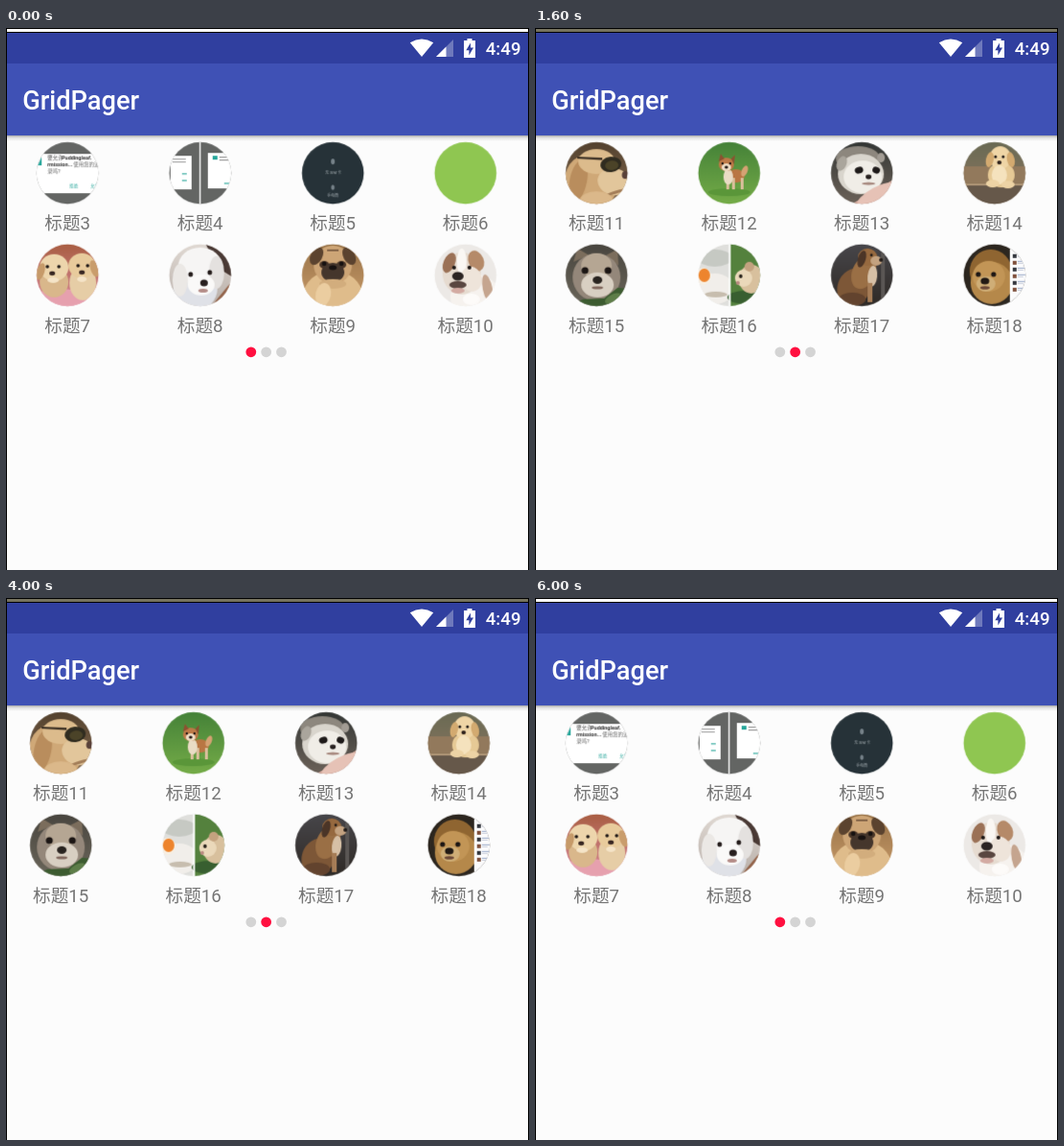
An HTML page with a canvas for the animation above (6100 ms loop, 546 px wide and 565 px high).

```html
<!DOCTYPE html>
<html lang="zh">
<head>
<meta charset="utf-8">
<title>GridPager</title>
<style>
html, body { margin: 0; width: 100%; height: 100%; overflow: hidden; background: #fcfcfc; }
canvas { display: block; }
</style>
</head>
<body>
<canvas id="stage" width="546" height="565"></canvas>
<script>
const ctx = document.getElementById('stage').getContext('2d');
const LOOP = 6100, STEP = 100;
const PAGE = 552, COL = 138.5, ROW = 106.5, RADIUS = 32.3;
const FONT = 'Roboto, "Noto Sans CJK SC", "Noto Sans CJK", sans-serif';

// Travel per step while dragged, then a quintic settle that ends at `end`.
const swipes = [
  { at: 900, end: 1680, from: 0, to: 1, drag: [20, 150, 315, 460] },
  { at: 2200, end: 3010, from: 1, to: 2, drag: [60, 245, 432, 504.5] },
  { at: 3600, end: 4280, from: 2, to: 1, drag: [69, 299] },
  { at: 4800, end: 5367, from: 1, to: 0, drag: [14, 319] }
];

function scrollAt(t) {
  const s = swipes.findLast((swipe) => t >= swipe.at);
  if (!s) return 0;
  if (t >= s.end) return s.to * PAGE;
  const i = (t - s.at) / STEP, last = s.drag.length - 1;
  let moved = s.drag[i];
  if (i > last) {
    const released = s.at + last * STEP;
    moved = PAGE - (PAGE - s.drag[last]) * ((s.end - t) / (s.end - released)) ** 5;
  }
  return Math.round(s.from * PAGE + (s.to - s.from) * moved);
}

// Thumbnails: local coordinates run from -32 to 32.
let g;
const fill = (c) => rect(-34, -34, 68, 68, c);
function rect(x, y, w, h, c) {
  g.fillStyle = c;
  g.fillRect(x, y, w, h);
}
function oval(x, y, rx, ry, c, turn = 0) {
  g.fillStyle = c;
  g.beginPath();
  g.ellipse(x, y, rx, ry, turn, 0, 7);
  g.fill();
}
function poly(c, ...p) {
  g.fillStyle = c;
  g.beginPath();
  for (let i = 0; i < p.length; i += 2) g.lineTo(p[i], p[i + 1]);
  g.fill();
}
function fade(top, bottom) {
  const grad = g.createLinearGradient(0, -32, 0, 32);
  grad.addColorStop(0, top);
  grad.addColorStop(1, bottom);
  fill(grad);
}
function note(text, x, y, size, c, weight = 400) {
  g.fillStyle = c;
  g.font = `${weight} ${size}px ${FONT}`;
  g.fillText(text, x, y);
}
function eyes(x, y, gap, r, c = '#1c1614') {
  oval(x - gap, y, r, r, c);
  oval(x + gap, y, r, r, c);
}

const sharp = new Set([3, 4, 5, 6]);
const pictures = {
  3() {
    fill('#646664');
    rect(-34, -20, 68, 41, '#fff');
    poly('#26a69a', -31, -8, -27, -17, -27, -8);
    note('要允许', -21, -14, 5.5, '#555');
    note('Puddingleaf.', -6, -14, 5.5, '#333', 700);
    note('rmission...', -21, -7, 5.5, '#333', 700);
    note('使用您的通', 6, -7, 5.5, '#666');
    note('录吗?', -21, 0, 5.5, '#666');
    note('拒绝', 2, 15, 4.5, '#26a69a');
    note('允许', 24, 15, 4.5, '#26a69a');
  },
  4() {
    fill('#636563');
    rect(-31, -18, 22, 35, '#fff');
    rect(8, -21, 24, 37, '#fff');
    rect(-1, -34, 1.5, 68, '#f4f4f4');
    rect(13, -18, 5, 4, '#26a69a');
    for (const y of [-15, -12]) {
      rect(-29, y, 14, 1, '#999');
      rect(20, y - 2, 10, 1, '#888');
    }
    for (const y of [0, 7]) rect(-19, y, 5, 1.5, '#5fbdb3');
    rect(25, 10, 5, 1.5, '#5fbdb3');
  },
  5() {
    fill('#263238');
    oval(0, -12, 2, 3, '#77838a');
    note('无 SIM 卡', -8, 1, 4, '#a6afb3');
    oval(0, 15, 1.8, 2.8, '#77838a');
    note('手电筒', -6, 25, 4, '#a6afb3');
  },
  6() {
    fill('#8fc651');
  },
  7() {
    fade('#a95e43', '#d9879a');
    oval(-8, 26, 30, 12, '#e6a0ae');
    oval(-14, 7, 15, 16, '#d9b78b');
    oval(16, 8, 14, 18, '#e6cda6');
    oval(-14, -8, 15, 14, '#edd5ac');
    oval(15, -10, 14, 13, '#e8cb9c');
    oval(-28, -4, 4, 9, '#c69a69', .3);
    oval(28, -7, 4, 9, '#c99d6c', -.3);
    eyes(-15, -9, 6, 1.8);
    eyes(16, -10, 5, 1.8);
    oval(-16, -2, 3, 2.2, '#382722');
    oval(15, -3, 3, 2.2, '#382722');
    oval(-15, 5, 6, 3, '#f5e4c8');
    oval(15, 4, 5, 3, '#f5e4c8');
  },
  8() {
    fade('#e0d9d3', '#b8afa9');
    poly('#493934', 5, -34, 34, -34, 34, 2, 18, -8);
    poly('#93634a', 10, 34, 34, 5, 34, 34);
    oval(-5, 13, 23, 24, '#dfe1e7');
    oval(0, -9, 23, 20, '#f6f5f4');
    oval(-21, 5, 8, 17, '#ebe8e5');
    oval(17, -3, 8, 17, '#e4e1df');
    oval(1, 10, 14, 11, '#faf9f8');
    oval(-10, -1, 2.4, 2.6, '#241c1b');
    oval(10, -3, 2.4, 2.6, '#241c1b');
    oval(4, 8, 4, 3.5, '#28201f');
    oval(3, 16, 5, 2, '#b48c87');
  },
  9() {
    fade('#987349', '#c99b68');
    oval(0, 22, 31, 27, '#dfbc8b');
    oval(0, -11, 20, 20, '#cda576');
    oval(-17, -20, 6, 10, '#5b432f', .5);
    oval(17, -20, 6, 10, '#5b432f', -.5);
    oval(-9, -11, 5, 4, '#493628');
    oval(9, -11, 5, 4, '#493628');
    oval(0, -3, 12, 10, '#45362c');
    eyes(0, -12, 9, 2.3, '#171211');
    oval(0, -8, 4, 2.5, '#171211');
    oval(0, 9, 14, 5, '#d2ad7d');
    oval(-10, 20, 8, 12, '#ebcda0', .2);
    rect(-6, -27, 12, 2, '#836346');
  },
  10() {
    fill('#ece9e6');
    oval(10, 22, 26, 23, '#f6f2ee');
    oval(23, 14, 5, 15, '#c5a58f', -.2);
    oval(-4, -2, 20, 22, '#e6dbd0');
    oval(-17, -13, 6, 11, '#9b7156', .4);
    oval(11, -15, 8, 11, '#b58a69', -.4);
    oval(-4, -14, 5, 14, '#faf7f3');
    oval(6, 4, 11, 13, '#eee4da', -.2);
    eyes(-4, -8, 8, 2);
    oval(-8, 1, 6, 4.5, '#2b2423');
    oval(-8, 10, 9, 4, '#5a4741');
    oval(-8, 16, 7, 3, '#d3aaa2');
    oval(6, 25, 9, 6, '#fdfbf9');
  },
  11() {
    fade('#54422f', '#83694f');
    oval(-6, 10, 27, 30, '#cfa877', -.3);
    oval(-19, 8, 9, 22, '#b98d5d', .2);
    oval(0, -12, 19, 13, '#dcbb8c');
    oval(18, 9, 17, 14, '#e2c69b', .2);
    poly('#3d3125', -20, -17, 6, -16, 6, -13.5, -20, -15);
    oval(15, -9, 11, 8, '#302c20', -.1);
    oval(16, -8, 7, 5, '#4b4328', -.1);
    oval(30, 2, 3.5, 4, '#594139');
    oval(20, 20, 12, 1.6, '#a37d58', -.3);
    oval(0, 28, 17, 9, '#dbb88a');
  },
  12() {
    fade('#458238', '#75ac48');
    oval(0, 20, 22, 4, '#5a9639');
    oval(7, 3, 9, 7, '#b97643');
    for (const x of [-3, 3, 12]) rect(x, 5, 3, 12, '#dabf9b');
    oval(-1, 4, 5, 8, '#eadcc5');
    oval(-3, -9, 8, 7, '#bd7947');
    poly('#8d5130', -11, -12, -9, -20, -5, -15);
    poly('#8d5130', 2, -15, 6, -19, 5, -9);
    oval(-3, -6, 5, 4, '#f0dfc7');
    eyes(-3, -10, 4, 1.2);
    oval(-3, -6, 1.8, 1.4, '#201713');
    oval(16, -2, 3, 6, '#d5a273', .4);
  },
  13() {
    fade('#343735', '#6c6259');
    oval(-4, -15, 23, 13, '#8d877e');
    oval(-1, 1, 24, 21, '#d9d5cd');
    oval(1, 4, 20, 17, '#f0ede7');
    poly('#ddb1a4', -10, 32, 11, 20, 34, 6, 34, 34);
    oval(15, 22, 22, 7, '#e6c2b6', -.5);
    oval(-3, -3, 4.5, 3.5, '#1f1b1a', -.3);
    oval(15, -3, 4, 3.5, '#1f1b1a', .3);
    oval(7, 4, 3, 2.4, '#27201f');
    oval(7, 11, 7, 1.5, '#a88a80');
    oval(-21, -10, 5, 8, '#aaa59c', .4);
    oval(20, -16, 4, 5, '#a29c94');
  },
  14() {
    fade('#6a6a54', '#8e7760');
    rect(-34, -7, 68, 20, '#92795c');
    rect(-34, 12, 68, 22, '#66584a');
    rect(-34, 11, 68, 2, '#ae9576');
    oval(7, 2, 14, 13, '#e6c995');
    oval(6, -16, 11, 12, '#efd5a6');
    oval(-5, -14, 4, 8, '#d3aa70', .2);
    oval(17, -14, 4, 8, '#d3aa70', -.2);
    oval(5, 2, 8, 10, '#f5e2bd');
    oval(-2, 11, 7, 4, '#edd3a5');
    oval(14, 12, 7, 4, '#edd3a5');
    eyes(5, -17, 4, 1.5);
    oval(5, -11, 2.4, 2, '#2e211b');
  },
  15() {
    fade('#49463f', '#6a655a');
    poly('#7b6d5c', -24, -14, -20, -28, -8, -21);
    poly('#7b6d5c', 10, -21, 22, -27, 23, -10);
    oval(0, 2, 25, 25, '#94877a');
    oval(0, -10, 16, 13, '#b5a693');
    oval(1, 10, 17, 13, '#d8cfc2');
    eyes(0, -5, 12, 3.6);
    oval(1, 5, 5, 4, '#28231f');
    oval(1, 13, 6, 1.6, '#80675d');
    poly('#3c5b30', -34, 34, -14, 25, 8, 24, 22, 13, 34, 14, 34, 34);
    oval(17, 24, 9, 4, '#5d7d48', -.5);
  },
  16() {
    fill('#dfdfdc');
    oval(-15, -18, 18, 9, '#c6c9c3');
    oval(-15, 14, 20, 16, '#f1eeea');
    oval(-27, 1, 8, 9, '#f8eee0');
    oval(-26, 0, 6, 7, '#ed842d');
    oval(-14, 20, 12, 3, '#c7bdae');
    rect(1, -34, 33, 68, '#54813d');
    oval(18, 23, 20, 7, '#385f30');
    oval(23, 4, 13, 15, '#d8c09d');
    oval(15, 3, 9, 9, '#ead8ba');
    oval(21, -9, 5, 5, '#c3a27f');
    oval(12, 1, 1.8, 2, '#231e18');
    oval(9, 8, 2, 2, '#b98980');
    rect(-.5, -34, 2, 68, '#fff');
  },
  17() {
    fade('#47464a', '#2f2a26');
    rect(20, -34, 4, 68, '#5a5654');
    oval(-8, 12, 17, 20, '#7d5737', .5);
    oval(2, -3, 12, 18, '#9a6f45', .4);
    oval(6, -19, 10, 9, '#96693f');
    oval(15, -15, 6, 5, '#c3a280');
    oval(0, -17, 4, 9, '#4b3527', .3);
    oval(11, 1, 5, 11, '#d6c0a6', .1);
    oval(20, -16, 2, 2, '#211b18');
    oval(10, -21, 1.4, 1.4, '#211b18');
    rect(6, 8, 5, 20, '#a67d57');
    oval(-10, 25, 14, 7, '#62432e');
  },
  18() {
    fill('#2c261f');
    oval(-4, -4, 22, 23, '#8f6531');
    oval(-3, 8, 22, 22, '#b5884a');
    oval(-6, 1, 17, 16, '#c29556');
    oval(-9, 9, 10, 8, '#cfae77');
    eyes(-9, -1, 8, 2.6);
    oval(-10, 6, 4.5, 3.5, '#211914');
    oval(-10, 13, 5, 1.8, '#6c4938');
    rect(16, -34, 18, 68, '#fbfbfc');
    for (let y = -22; y < 20; y += 7) {
      rect(19, y, 4, 4, y % 2 ? '#80513d' : '#35383f');
      rect(24, y, 8, 1, '#9babca');
      rect(24, y + 2, 6, 1, '#c6ccda');
    }
  },
  19() {
    fade('#ce8440', '#eed2ad');
    oval(0, 23, 34, 14, '#f5e6d0');
    oval(0, -4, 25, 24, '#c59b6b');
    oval(-21, -13, 8, 11, '#38291f', .5);
    oval(21, -13, 8, 11, '#38291f', -.5);
    oval(0, -15, 13, 10, '#d6b17d');
    oval(-11, -2, 8, 7, '#3d3026');
    oval(11, -2, 8, 7, '#3d3026');
    oval(0, 7, 15, 11, '#302720');
    eyes(0, -2, 11, 4, '#100e0d');
    oval(0, 3, 4, 3, '#0e0c0b');
    oval(-19, 20, 9, 6, '#dfbd91');
    oval(19, 20, 9, 6, '#dfbd91');
  },
  20() {
    fill('#cda28c');
    rect(-34, -34, 68, 27, '#788c4c');
    oval(0, -21, 21, 18, '#b27b4c');
    oval(-16, -18, 6, 13, '#81502f', .2);
    oval(16, -18, 6, 13, '#81502f', -.2);
    oval(0, -18, 12, 9, '#d7b28b');
    eyes(0, -25, 8, 2);
    oval(0, -18, 4.5, 3.5, '#241c19');
    rect(-34, -9, 68, 43, '#dcb39d');
    for (const x of [-27, -11, 8, 21]) {
      rect(x, -5, 12, 13, '#865b45');
      oval(x + 6, 0, 3.5, 4, '#3e383a');
    }
    for (const x of [-23, -9]) rect(x, 13, 11, 12, '#9c6952');
    for (let y = 12; y < 28; y += 3) rect(6, y, 18, 1, '#b98d7b');
    rect(-34, 9, 68, 1.5, '#efd0bd');
  }
};

function makeThumb(n) {
  const c = document.createElement('canvas');
  c.width = c.height = 68;
  g = c.getContext('2d');
  g.translate(34, 34);
  g.beginPath();
  g.arc(0, 0, RADIUS, 0, 7);
  g.clip();
  if (!sharp.has(n)) g.filter = 'blur(0.7px)';
  pictures[n]();
  return c;
}

const items = Object.keys(pictures).map((key, i) => ({
  label: '标题' + key,
  thumb: makeThumb(+key),
  x: 64.2 + Math.floor(i / 8) * PAGE + (i % 4) * COL,
  y: 151.2 + Math.floor(i % 8 / 4) * ROW
}));
g = ctx;

function drawText(text, x, y, size, weight, color, align = 'left') {
  ctx.textAlign = align;
  note(text, x, y, size, color, weight);
}

function drawStatusBar() {
  rect(0, 4, 546, 33, '#303f9f');
  ctx.fillStyle = '#fff';
  ctx.beginPath();
  ctx.moveTo(434, 30);
  ctx.lineTo(421.8, 15.2);
  ctx.quadraticCurveTo(434, 7.8, 446.2, 15.2);
  ctx.fill();
  poly('#6e79bc', 449, 30, 467, 12, 467, 30);
  poly('#fff', 449, 30, 459.5, 19.5, 459.5, 30);
  rect(478, 13, 12, 18, '#fff');
  rect(481.5, 11, 5, 3, '#fff');
  poly('#303f9f', 485, 15.5, 480.3, 23.3, 483.4, 23.3, 483.4, 28.5, 488, 20.6, 485, 20.6);
  drawText('4:49', 537.5, 28, 18.67, 500, '#fff', 'right');
}

function drawHeader() {
  drawStatusBar();
  rect(0, 37, 546, 75, '#3f51b5');
  const shadow = ctx.createLinearGradient(0, 112, 0, 118);
  shadow.addColorStop(0, 'rgba(0,0,0,.33)');
  shadow.addColorStop(.4, 'rgba(0,0,0,.11)');
  shadow.addColorStop(1, 'rgba(0,0,0,0)');
  rect(0, 112, 546, 6, shadow);
  drawText('GridPager', 17.2, 85, 27.2, 500, '#fff');
}

function drawFrame(t) {
  rect(0, 0, 546, 5, '#000');
  rect(0, 1, 546, 3, t >= 900 && t < 6000 ? '#77745f' : '#fff');
  rect(0, 0, 1, 565, '#000');
  rect(545, 0, 1, 565, '#000');
}

function draw(t) {
  const scroll = scrollAt(t);
  rect(0, 0, 546, 565, '#fcfcfc');
  for (const { label, thumb, x, y } of items) {
    const left = x - scroll;
    if (left < -40 || left > 586) continue;
    ctx.drawImage(thumb, left - 34, y - 34);
    drawText(label, left, Math.round(y + 58.8), 18.67, 400, '#757575', 'center');
  }
  const page = Math.floor(scroll / PAGE);
  for (let i = 0; i < 3; i++) {
    oval(255.8 + i * 15.85, 337.8, 5.4, 5.4, i === page ? '#ff1040' : '#d4d4d4');
  }
  drawHeader();
  drawFrame(t);
}

function tick() {
  const t = performance.now() % LOOP;
  draw(Math.floor(t / STEP) * STEP);
  requestAnimationFrame(tick);
}
tick();
</script>
</body>
</html>
```
